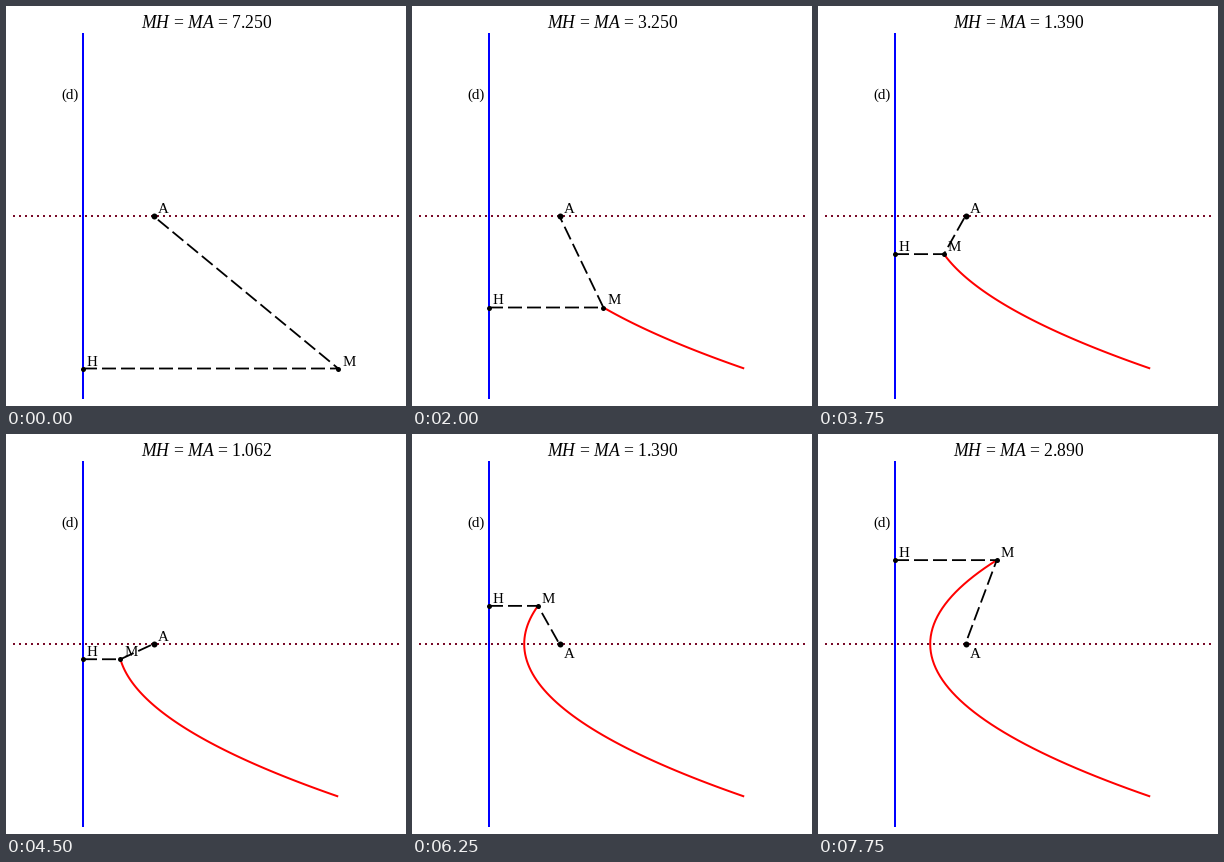
These frames come from a looping animation (400x400 px, 8000 ms). A matplotlib script:

```python
import numpy as np
import matplotlib as mpl
import matplotlib.pyplot as plt
from matplotlib.animation import FuncAnimation

mpl.rcParams.update({
    "font.family": "Liberation Serif",
    "mathtext.fontset": "custom",
    "mathtext.rm": "Liberation Serif",
    "mathtext.it": "Liberation Serif:italic",
})

SIZE = 400
DPI = 100
PX = 72 / DPI              # points per pixel
LINE_X, AXIS_Y = 77, 210   # directrix and axis, in pixels
UNIT_X, UNIT_Y = 35.2, 30.5
FRAMES, INTERVAL = 32, 250
START = -5.0


def to_px(x, y):
    return LINE_X + (x + 1) * UNIT_X, AXIS_Y - y * UNIT_Y


def parabola(y):
    return y * y / 4


def distance(y):
    """Length MA, with the abscissa kept to three significant digits."""
    x = float(f"{parabola(y):.3g}")
    return np.hypot(x - 1, y)


fig = plt.figure(figsize=(SIZE / DPI, SIZE / DPI), dpi=DPI, facecolor="white")
ax = fig.add_axes([0, 0, 1, 1])
ax.set_xlim(0, SIZE)
ax.set_ylim(SIZE, 0)
ax.axis("off")


def line(xs, ys, color, width=2, **kw):
    kw.setdefault("solid_capstyle", "butt")
    return ax.plot(xs, ys, color=color, lw=width * PX, **kw)[0]


def dot(x, y, size):
    return ax.plot([x], [y], "o", color="black", ms=size * PX, mew=0, zorder=6)[0]


def label(text, x, y, size=15, ha="left"):
    return ax.text(x, y, text, fontsize=size * PX, ha=ha, va="baseline",
                   color="black", zorder=7)


ax_x, ax_y = to_px(1, 0)

line([LINE_X] * 2, [27, 393], "#0000ff")
line([7, 395], [AXIS_Y] * 2, "#780a28", dashes=(1, 2), dash_capstyle="butt")
trace = line([], [], "#ff0000", zorder=3)
segments = line([], [], "black", 1.8, dashes=(14 / 1.8, 5 / 1.8),
                dash_capstyle="butt", zorder=4)

dot(ax_x + 0.3, ax_y, 6)
dot_h = dot(LINE_X, 0, 5)
dot_m = dot(0, 0, 5)

label("(d)", 55.5, 93)
label_a = label("A", ax_x + 4, 207)
label_h = label("H", LINE_X + 4, 0)
label_m = label("M", 0, 0)
title = label("", 201, 22, 17.6, "center")


def update(i):
    y = START + i * INTERVAL / 1000
    mx, my = to_px(parabola(y), y)

    ys = np.linspace(START, y, 60)
    trace.set_data(*to_px(parabola(ys), ys))
    trace.set_visible(i > 0)
    segments.set_data([LINE_X, mx, ax_x], [my, my, ax_y])

    dot_h.set_data([LINE_X + 0.3], [my])
    dot_m.set_data([mx], [my])
    label_h.set_y(my - 3)
    label_m.set_position((mx + 4, my - 3))
    # A's label stays on the side of the axis away from M
    label_a.set_y(207 if y < 0 else 224)
    title.set_text(rf"$\mathit{{MH}}$ = $\mathit{{MA}}$ = {distance(y):.3f}")
    return trace, segments, dot_h, dot_m, label_h, label_m, label_a, title


anim = FuncAnimation(fig, update, frames=FRAMES, interval=INTERVAL,
                     repeat=True, repeat_delay=0, blit=False)
plt.show()
```
